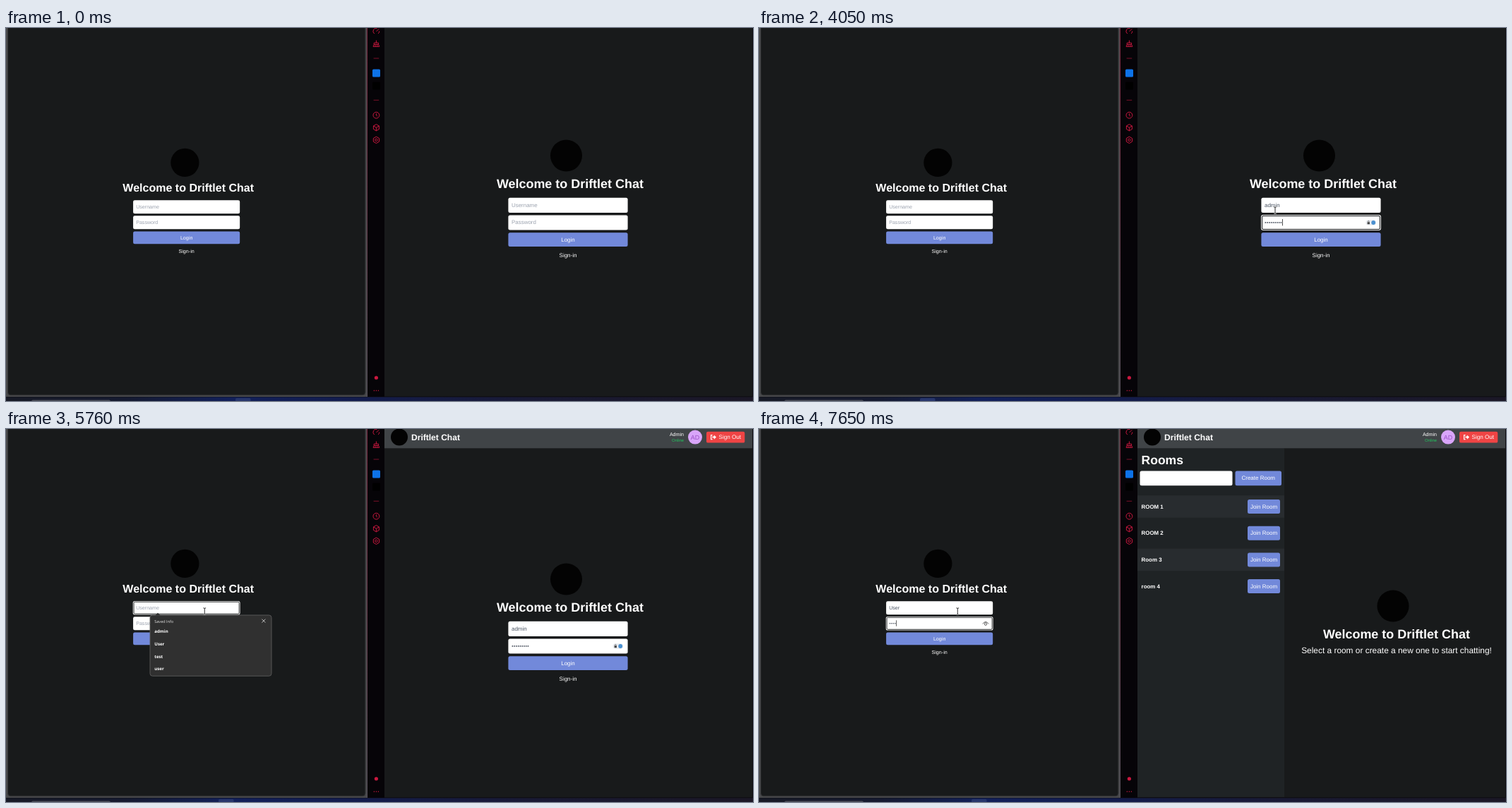
Recreate the animation shown at these times as an HTML page. Size 1058 px wide and 529 px high, loop 8000 ms.

```html
<!DOCTYPE html>
<html lang="en">
<head>
<meta charset="utf-8">
<title>Two chat logins</title>
<style>
  html, body { margin: 0; width: 100%; height: 100%; overflow: hidden; background: #181a1b; }
  svg { display: block; width: 100vw; height: 100vh; }
  text { font-family: "Liberation Sans", Arial, sans-serif; white-space: pre; text-rendering: geometricPrecision; }
</style>
</head>
<body>
<svg viewBox="0 0 1058 529" preserveAspectRatio="none">
  <defs>
    <linearGradient id="taskbar">
      <stop offset="0" stop-color="#171a26"/>
      <stop offset=".16" stop-color="#151a30"/>
      <stop offset=".3" stop-color="#12205a"/>
      <stop offset=".48" stop-color="#131c4c"/>
      <stop offset=".7" stop-color="#191a35"/>
      <stop offset="1" stop-color="#1b1726"/>
    </linearGradient>
    <linearGradient id="divider" x2="0" y2="1">
      <stop offset="0" stop-color="#7c2840"/>
      <stop offset="1" stop-color="#55505a"/>
    </linearGradient>
  </defs>
  <g id="backdrop"></g>
  <g id="scene"></g>
</svg>
<script>
const LOOP = 8000, BLINK = 530;
const APP = 'Driftlet Chat';
const PANEL = '#181a1b', BLUE = '#7289da', RED = '#c9183f';

// Moments of the story, in ms
const RIGHT_CLICK = 790, RIGHT_TAB = 2170, LEFT_CLICK = 5230, LEFT_TAB = 6620;
const HEADER_AT = 5760, ROOMS_AT = 6200, LOADED_AT = 7150;
const RIGHT_NAME_KEYS = [1550, 1650, 1770, 1880, 2010];
const RIGHT_PASS_KEYS = [2630, 2790, 2880, 3030, 3110, 3560, 3880, 3960, 4050];
const LEFT_NAME_KEYS = [5920, 6080, 6230, 6380];
const LEFT_PASS_KEYS = [7330, 7500, 7580, 7650];

const clamp = v => Math.max(0, Math.min(1, v));
const ramp = (t, from, to) => clamp((t - from) / (to - from));
const easeOut = p => 1 - (1 - p) ** 3;
const easeInOut = p => p * p * (3 - 2 * p);
const lerp = (a, b, p) => a + (b - a) * p;
const pressed = (keys, t) => keys.filter(k => k <= t).length;

const rect = (x, y, w, h, fill, r = 0, more = '') =>
  `<rect x="${x}" y="${y}" width="${w}" height="${h}" rx="${r}" fill="${fill}" ${more}/>`;
const disc = (x, y, r, fill) => `<circle cx="${x}" cy="${y}" r="${r}" fill="${fill}"/>`;
const line = (d, color, width = 1) =>
  `<path d="${d}" fill="none" stroke="${color}" stroke-width="${width}"/>`;
const group = (transform, body, more = '') => `<g transform="${transform}" ${more}>${body}</g>`;
// y is the vertical middle of the capitals
const label = (x, y, size, str, { fill = '#fff', anchor = 'start', bold = false, font = '' } = {}) =>
  `<text x="${x}" y="${y + size * .36}" font-size="${size}" fill="${fill}" text-anchor="${anchor}"` +
  `${bold ? ' font-weight="700"' : ''}${font ? ` style="font-family:${font}"` : ''}>${str}</text>`;
const center = { anchor: 'middle' };
const bold = { bold: true };
const button = (x, y, w, h, str) =>
  rect(x, y, w, h, BLUE, 2.5) + label(x + w / 2, y + h / 2 - .3, 8, str, center);

function sidebar() {
  const hex = r => [0, 1, 2, 3, 4, 5].map(i => {
    const a = Math.PI * (i / 3 + 1 / 6);
    return `${(r * Math.cos(a)).toFixed(2)},${(r * Math.sin(a)).toFixed(2)}`;
  }).join('L');
  const icon = (y, d, width = 1) => group(`translate(524.4 ${y})`, line(d, RED, width));
  return rect(512, 0, 24, 523, '#060408') +
    icon(4.5, 'M-2.6 3.6A4.4 4.4 0 0 1 1.2-4.2M.2 .4L3.8-3.2M4.3 0A4.3 4.3 0 0 1 2.8 3.4') +
    icon(22, 'M0-4.5V-1M-3.2-.8H3.2V1.5H-3.2ZM-3.2 1.5L-4.4 4.3H4.4L3.2 1.5M-1.4 4V2.4M1.4 4V2.4') +
    icon(43, 'M-3.8 0H3.8', .6) +
    rect(519, 58.5, 11, 11, '#0d72e8', 1.5) +
    rect(519, 76.5, 11, 11, '#000', 1.5) +
    icon(102.3, 'M-3.8 0H3.8', .6) +
    icon(123.7, 'M-4.4 0A4.4 4.4 0 1 1 4.4 0A4.4 4.4 0 1 1-4.4 0M0-2.6V.2L1.7 1.6') +
    icon(141.2, `M${hex(4.6)}ZM0 4.6V0L-4-2.3M0 0L4-2.3`) +
    icon(158.8, `M${hex(4.7)}ZM-1.7 0A1.7 1.7 0 1 1 1.7 0A1.7 1.7 0 1 1-1.7 0`) +
    disc(524.4, 496, 2.6, RED) +
    [-3, 0, 3].map(dx => disc(524.4 + dx, 514.3, .75, RED)).join('');
}

function backdrop() {
  return rect(0, 0, 1058, 529, '#101014') +
    rect(0, 0, 512, 523, '#48494b') +
    rect(2.5, -10, 506.5, 530.8, PANEL, 4, 'stroke="#37383a"') +
    rect(511, 0, 1, 523, 'url(#divider)') +
    sidebar() +
    rect(536, 0, 521, 522, PANEL) +
    rect(1057, 0, 1, 523, '#0a090d') +
    rect(0, 523.5, 1058, 6, 'url(#taskbar)') +
    rect(36, 527.5, 112, 5, '#4a4d58', 2);
}

const logo = (x, y, r = 22.5) => disc(x, y, r, '#030303');
const welcome = (x, y) => label(x, y, 17.95, `Welcome to ${APP}`, bold);

function inputBox(y, { value, hint, dots, focused, caret }) {
  const textEnd = dots ? 716.3 + 2.75 * dots : 716 + [0, 4.4, 8.8, 15.4, 17.1, 21.5][value.length];
  let out = focused
    ? rect(711, y - .4, 170, 22, '#fff', 3) +
      rect(712.5, y + 1.1, 167, 19, '#fff', 1.5, 'stroke="#101214" stroke-width="1"')
    : rect(711.4, y, 169.2, 21.2, '#fff', 2.5);
  if (dots) {
    for (let i = 0; i < dots; i++) out += disc(717.4 + 2.75 * i, y + 10.5, .9, '#3c4452');
  } else {
    out += label(716, y + 10.1, 7.95, value || hint, { fill: value ? '#4b5563' : '#9ca3af' });
  }
  if (focused && caret) out += rect(textEnd, y + 5.6, .8, 9.4, '#222');
  return out;
}

// Password manager badge: a padlock and a round mark
const badge = (y, opacity) => opacity <= 0 ? '' : `<g opacity="${opacity}">` +
  rect(859.5, y - 3.8, 14.6, 7.6, '#e8ebf0', 3.8) +
  rect(861.6, y - .7, 3.4, 2.9, '#444', .5) +
  line(`M862.3 ${y - .6}V${y - 1.5}A1 1 0 0 1 864.3 ${y - 1.5}V${y - .6}`, '#444', .6) +
  disc(870.2, y, 2.9, '#4a90d0') + '</g>';

function form(s) {
  return logo(793.5, 181) +
    welcome(694.9, 220.8) +
    inputBox(240.7, { value: s.name, hint: 'Username', focused: s.focus === 'name', caret: s.caret }) +
    inputBox(265.4, { value: '', dots: s.dots, hint: 'Password', focused: s.focus === 'pass', caret: s.caret }) +
    button(711.4, 290.3, 169.2, 19.8, 'Login') +
    label(796, 321.8, 8, 'Sign-in', center);
}

// The caret restarts its blink at every focus change and key press
function caretOn(t, moments) {
  const last = Math.max(0, ...moments.filter(m => m <= t));
  return Math.floor((t - last) / BLINK) % 2 === 0;
}

function rightLogin(t) {
  const focus = t < RIGHT_CLICK || t >= LEFT_CLICK ? '' : t < RIGHT_TAB ? 'name' : 'pass';
  const body = form({
    name: 'admin'.slice(0, pressed(RIGHT_NAME_KEYS, t)),
    dots: pressed(RIGHT_PASS_KEYS, t),
    focus,
    caret: caretOn(t, [RIGHT_CLICK, RIGHT_TAB, ...RIGHT_NAME_KEYS, ...RIGHT_PASS_KEYS])
  });
  const marks = (focus === 'name' ? badge(251, ramp(t, 960, 1070)) : '') +
    badge(276, ramp(t, 2230, 2440));
  return group(`translate(0 ${t >= HEADER_AT ? 32 : 0})`, body + marks);
}

function leftLogin(t) {
  const dots = pressed(LEFT_PASS_KEYS, t);
  const body = form({
    name: 'User'.slice(0, pressed(LEFT_NAME_KEYS, t)),
    dots,
    focus: t < LEFT_CLICK ? '' : t < LEFT_TAB ? 'name' : 'pass',
    caret: caretOn(t, [LEFT_CLICK, LEFT_TAB, ...LEFT_NAME_KEYS, ...LEFT_PASS_KEYS])
  });
  const eye = dots ? line('M316.8 276.4Q321 270.6 325.2 276.4', '#333', .8) +
    '<circle cx="321" cy="276.6" r="1.7" fill="none" stroke="#333" stroke-width=".8"/>' : '';
  return group('translate(-455.2 29.3) scale(.893)', body) + eye;
}

function savedInfo(t) {
  const opacity = ramp(t, LEFT_CLICK, 5300) * (1 - ramp(t, 6700, 6880));
  if (!opacity) return '';
  const rows = t < LEFT_NAME_KEYS[0] ? ['admin', 'User', 'test', 'user'] : ['User', 'user'];
  const font = "'Open Sans','Noto Sans',sans-serif";
  const h = 15.5 + 17.7 * rows.length, cy = 264 + h / 2, k = .95 + .05 * opacity;
  const body = rect(204, 264, 172, h, '#303030', 3.5, 'stroke="#5c5c5c" stroke-width=".9"') +
    '<path d="M211.5 264.2L215 260.8L218.5 264.2Z" fill="#303030"/>' +
    label(210.3, 273, 5.5, 'Saved Info', { fill: '#e6e6e6', font }) +
    line('M362.4 269.6L367.4 274.6M367.4 269.6L362.4 274.6', '#ddd', .8) +
    rows.map((r, i) => label(210.3, 287 + 17.7 * i, 6.1, r, { bold: true, font })).join('');
  return group(`translate(290 ${cy}) scale(${k}) translate(-290 ${-cy})`, body, `opacity="${opacity}"`);
}

function header() {
  return rect(536, 0, 521, 27.3, '#404447') +
    logo(557, 11.5, 12) +
    label(574, 11.2, 12.05, APP, bold) +
    label(960, 7.2, 7.1, 'Admin', { anchor: 'end' }) +
    label(960, 16.3, 5.9, 'Online', { anchor: 'end', fill: '#22c55e' }) +
    disc(976, 11.6, 10, '#d9a5fa') +
    label(976, 11.8, 8.9, 'AD', { anchor: 'middle', fill: '#9a4fc4' }) +
    rect(992, 3.8, 54.3, 15.8, '#ef4444', 2.2) +
    line('M1000.6 8.6H998.6V14.6H1000.6', '#fff', 1.2) +
    '<path d="M1000.4 10.6H1002.8V8.4L1006 11.6L1002.8 14.8V12.6H1000.4Z" fill="#fff"/>' +
    label(1009.6, 11.4, 8.1, 'Sign Out');
}

const spinner = (x, y, t) => group(`translate(${x} ${y}) rotate(${(t - 6790) * .36})`,
  line('M-7.4 0A7.4 7.4 0 1 1 7.4 0A7.4 7.4 0 1 1-7.4 0', '#545a63', 1.5) +
  line('M0-7.4A7.4 7.4 0 0 1 7.2-1.6', BLUE, 1.5));

function rooms(t) {
  const base = rect(536, 27.3, 208, 494.7, '#1f2325') +
    label(541.6, 43.6, 17.5, 'Rooms', bold) +
    rect(539.5, 59.6, 131, 20.6, '#fff', 2.5) +
    button(674.5, 59.6, 65.5, 20.6, 'Create Room');
  if (t < LOADED_AT) return base + spinner(640, 102, t) + spinner(900, 274.7, t);
  const list = ['ROOM 1', 'ROOM 2', 'Room 3', 'room 4'].map((name, i) => {
    const y = 94.2 + 37.7 * i;
    return (i % 2 ? '' : rect(536, y, 208, 31.6, '#282c2f')) +
      label(541.6, y + 15.6, 7.9, name, bold) +
      button(692, y + 5.8, 46, 20, 'Join Room');
  }).join('');
  return base + list + logo(898, 251) +
    welcome(798.9, 290.8) +
    label(903, 313.8, 11.9, 'Select a room or create a new one to start chatting!', center);
}

function cursor(t) {
  if (t < 120) return '';
  const arrive = easeOut(ramp(t, 60, 760)), cross = easeInOut(ramp(t, 4580, 5180));
  const x = lerp(lerp(1004, 731, arrive), 281.3, cross);
  const y = lerp(440, 258.6, arrive);
  const overInput = y > 241 && y < 287 && (x > 711 && x < 881 || x > 180 && x < 331);
  const beam = 'M-1.8-4.8Q0-4.8 0-3.6V3.6Q0 4.8-1.8 4.8M1.8-4.8Q0-4.8 0-3.6M0 3.6Q0 4.8 1.8 4.8';
  const shape = overInput
    ? line(beam, '#ddd', 1.6) + line(beam, '#333', .9)
    : '<path d="M0 0V9.6L2.3 7.6L3.8 10.9L5.3 10.2L3.8 7H6.9Z" fill="#fff" stroke="#111" stroke-width=".6"/>';
  return group(`translate(${x} ${y})`, shape);
}

function taskbarMark(t) {
  const x = t < RIGHT_CLICK ? 325 : t < LEFT_CLICK ? 228 : 301;
  return rect(x, 525, 21.5, 5, '#27366c', 1.5);
}

function render(t) {
  document.getElementById('scene').innerHTML =
    taskbarMark(t) +
    (t < ROOMS_AT ? rightLogin(t) : rooms(t)) +
    (t >= HEADER_AT ? header() : '') +
    leftLogin(t) + savedInfo(t) + cursor(t);
}

document.getElementById('backdrop').innerHTML = backdrop();
const start = performance.now();
function tick() {
  render((performance.now() - start) % LOOP);
  requestAnimationFrame(tick);
}
tick();
</script>
</body>
</html>
```
